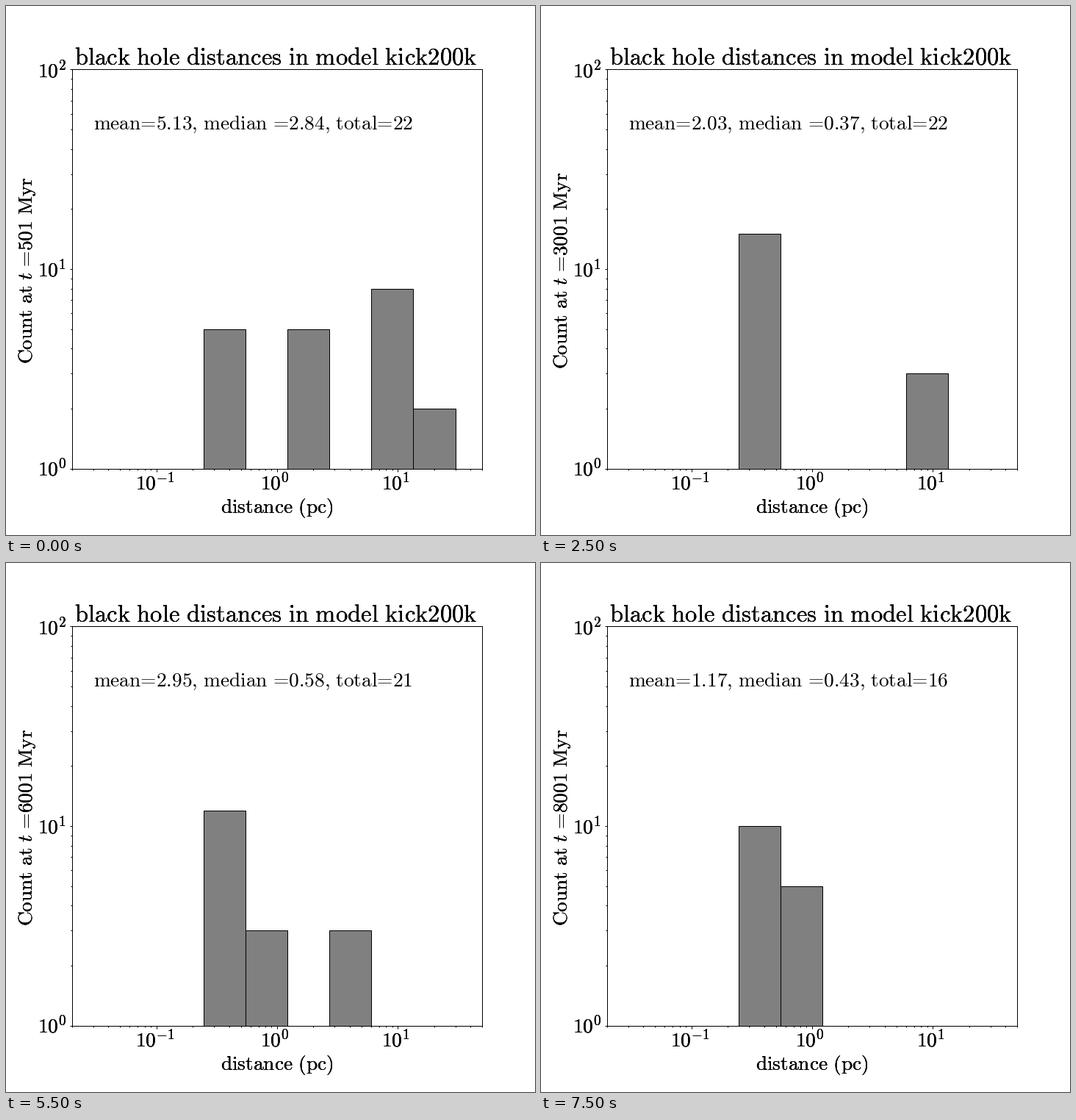
A matplotlib script for the animation above (8000 ms loop, 720 by 720 pixels).

```python
import matplotlib.pyplot as plt
import numpy as np
from matplotlib.animation import FuncAnimation
from matplotlib.ticker import NullFormatter

plt.rcParams["mathtext.fontset"] = "cm"

SIZE = 720
STEP_MS = 500
TEXT, TITLE = 27.4, 32.7

# mean, median, total, counts per bin from 0.25 pc outwards
STEPS = [
    (5.13, 2.84, 22, (5, 1, 5, 1, 8, 2)),
    (3.87, 2.65, 22, (8, 1, 2, 6, 5)),
    (3.41, 0.73, 22, (11, 1, 1, 4, 5)),
    (2.87, 0.52, 22, (13, 1, 1, 2, 4)),
    (2.56, 0.46, 22, (13, 1, 3, 1, 4)),
    (2.03, 0.37, 22, (15, 1, 1, 1, 3)),
    (1.98, 0.47, 22, (14, 2, 1, 1, 3)),
    (2.14, 0.42, 22, (13, 2, 1, 1, 4)),
    (2.23, 0.46, 22, (14, 1, 1, 2, 3)),
    (2.28, 0.51, 22, (14, 1, 1, 3, 1)),
    (2.36, 0.54, 22, (12, 4, 1, 3, 1)),
    (2.95, 0.58, 21, (12, 3, 1, 3, 1)),
    (6.52, 0.93, 20, (10, 3, 3, 1, 1)),
    (1.37, 0.47, 16, (10, 3, 2, 1)),
    (1.29, 0.33, 16, (13, 1, 1, 1)),
    (1.17, 0.43, 16, (10, 5, 1)),
]


def roman(text):
    """Upright Computer Modern with text-mode spacing."""
    for plain, tex in ((",", "{,}"), (" ", r"\ "),
                       ("=", r"\hspace{-0.2}=\hspace{-0.2}")):
        text = text.replace(plain, tex)
    return r"\mathrm{%s}" % text


def label(x, y, text, size=TEXT, **kw):
    """Heavy text at a pixel position, overprinted for weight."""
    return [fig.text(x / SIZE, 1 - y / SIZE, f"${text}$", fontsize=size,
                     va="baseline", **kw) for _ in range(3)]


fig = plt.figure(figsize=(10, 10), dpi=72, facecolor="white")
ax = fig.add_axes([0.125, 0.125, 0.775, 0.755])
ax.set(xscale="log", yscale="log", xlim=(0.02, 50), ylim=(1, 100))
for axis in (ax.xaxis, ax.yaxis):
    axis.set_major_formatter(NullFormatter())
    axis.set_minor_formatter(NullFormatter())
ax.tick_params(which="both", width=1)
for spine in ax.spines.values():
    spine.set_linewidth(1)

edges = np.logspace(-2, np.log10(30), 11)[4:]
bars = ax.bar(edges[:-1], np.ones(6), np.diff(edges), align="edge",
              color="gray", edgecolor="black", linewidth=1)

label(367.5, 80, roman("black hole distances in model kick200k"), TITLE,
      ha="center")
label(368.5, 690, roman("distance (pc)"), ha="center")
for x, power in ((176, -1), (346, 0), (511, 1)):
    label(x, 658, f"10^{{{power}}}", ha="left")
for y, power in ((639, 0), (368, 1), (97, 2)):
    label(43, y, f"10^{{{power}}}", ha="left")
count_label = label(36, 359.5, "t", ha="center", rotation=90,
                    rotation_mode="anchor")
stats = ax.text(0.03, 50, "", fontsize=TEXT, va="baseline", ha="left")


def update(i):
    mean, median, total, counts = STEPS[i]
    for bar in bars:
        bar.set_bounds(bar.get_x(), 1, bar.get_width(), 0)
    for bar, n in zip(bars, counts):
        bar.set_height(n - 1)
    stats.set_text("$" + roman(
        f"mean={mean:.2f}, median ={median:.2f}, total={total}") + "$")
    when = (roman("Count at ") + "t"
            + roman(f" ={501 + 500 * i} Myr"))
    for item in count_label:
        item.set_text(f"${when}$")
    return [*bars, stats, *count_label]


anim = FuncAnimation(fig, update, frames=len(STEPS), interval=STEP_MS,
                     repeat=True, blit=False)
plt.show()
```
